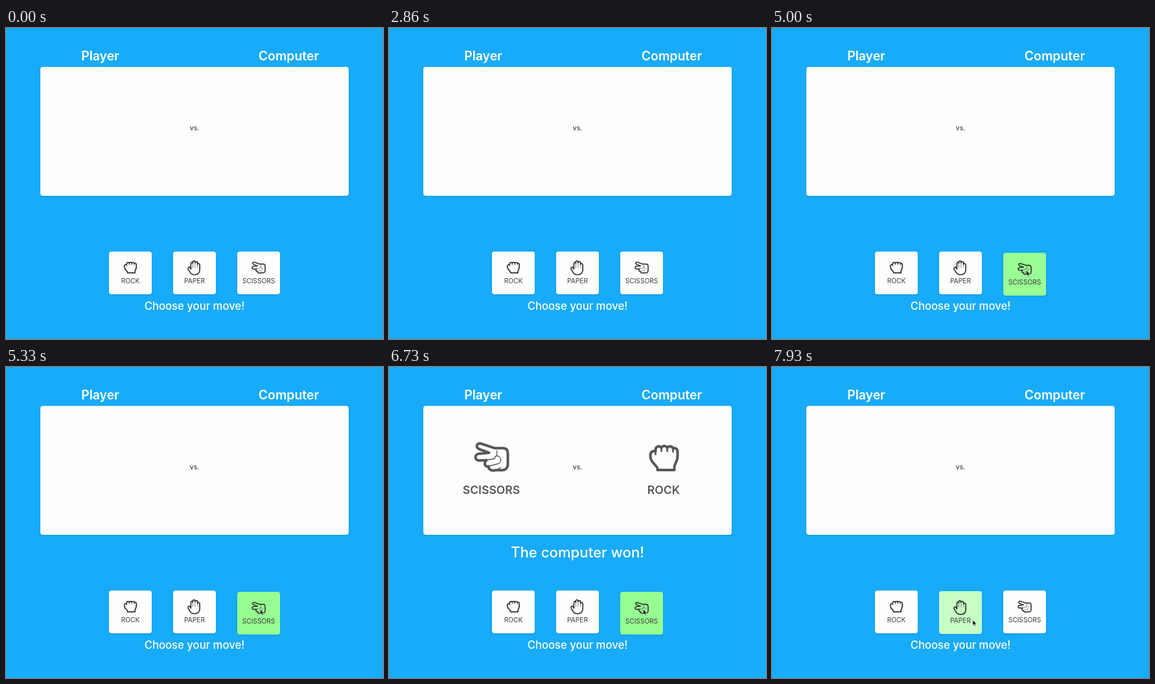
An HTML page for the animation above (8 s loop, 582 by 480 pixels).

```html
<!DOCTYPE html>
<html lang="en">
<head>
<meta charset="utf-8">
<title>Rock Paper Scissors</title>
<style>
  html, body { margin: 0; width: 100%; height: 100%; overflow: hidden; background: #18abf9; }
  svg { display: block; width: 582px; height: 480px; }
  text { font-family: Inter, "Open Sans", sans-serif; text-anchor: middle; }
  .light { fill: #fff; font-weight: 500; }
  .heading { font-size: 19.4px; font-weight: 600; }
  .label { fill: #3c3c3c; font-size: 10.2px; }
  .choice { fill: #575757; font-size: 17.6px; font-weight: 600; }
  .box { filter: drop-shadow(0 1px 1px rgba(0, 0, 0, .12)); }
  .icon { fill: none; stroke-width: 4; stroke-linejoin: round; stroke-linecap: round; }
  .icon .thin { stroke-width: 1.4; }
</style>
</head>
<body>
<svg viewBox="0 0 582 480">
  <defs>
    <g id="rock" class="icon">
      <path d="M-10 18V16C-10 11-21 7-21-3V-5C-21-10-17-12-13-11V-13C-13-19-6-20-4-16C-3-20 4-20 5-16C7-20 13-19 14-15C17-17 21-15 21-10V-3C21 5 16 8 16 14V18Z"/>
      <path d="M-13-11v5M-4-16v5M5-16v5M14-15v5" stroke-width="2.6"/>
    </g>
    <g id="paper" class="icon">
      <path d="M-13 5V-15C-13-21-7-21-6-16V-20C-6-26 2-26 2-20V-18C3-23 11-23 11-17V-12C12-17 19-16 19-10V6C19 18 12 25 1 25H-1C-9 25-14 20-17 15L-23 5C-25-1-19-4-16 0Z"/>
      <path class="thin" d="M-6-16V-1M2-18V-1M11-12V-1"/>
    </g>
    <g id="scissors" class="icon">
      <path d="M5-14L-16-21C-23-23-26-15-19-12.5L-4-7L-19-5.5C-27-5-27 5-19 5L-8 4.500C-13 10-10 15-5 14C-5 19 0 21.500 5 20H16C22 20 25 16 25 10V-5C25-11 23-14 18-14Z"/>
      <path class="thin" d="M-8 4.500L5 2M-5 14L8 10.500M8-10V-2C16-2 16 10 8 10.500M5 2C4-1 6-2 8-2M5 20L14 16"/>
    </g>
  </defs>

  <rect width="582" height="480" fill="#18abf9"/>
  <text class="light heading" x="145.500" y="50.300">Player</text>
  <text class="light heading" x="436.500" y="50.300">Computer</text>
  <rect class="box" x="53" y="60" width="476" height="199" rx="4" fill="#fefefd"/>
  <text class="label" x="291" y="158" font-weight="500">vs.</text>

  <g id="result" stroke="#575757">
    <use href="#scissors" x="158.500" y="139.300"/>
    <use href="#rock" x="424.500" y="141"/>
    <g stroke="none">
      <text class="choice" x="158" y="195.500">SCISSORS</text>
      <text class="choice" x="424" y="195.500">ROCK</text>
      <text class="light" x="291" y="293.700" font-size="22.200">The computer won!</text>
    </g>
  </g>

  <g id="cards"></g>
  <text class="light" x="291" y="435" font-size="16.700">Choose your move!</text>
  <path id="cursor" d="M0 0V8.200L1.900 6.600L3.200 9.400L4.600 8.800L3.300 6.100H5.800Z" fill="#111" stroke="#fff" stroke-width=".5"/>
</svg>
<script>
const LOOP = 8000, SHOW = 5400, RESET = 7400;
const $ = id => document.getElementById(id);
const clamp = v => Math.min(1, Math.max(0, v));

// Cursor stops: time, x, y
const path = [
  [4060, 480, 350], [4330, 447, 358], [4600, 417, 366], [4800, 399, 372], [4960, 392.500, 374],
  [7380, 392.500, 374], [7530, 356.500, 389.500], [7775, 324, 391], [7930, 310, 390.500], [8000, 306, 390.500]
];

const cards = [['rock', 192, .44], ['paper', 291, .43], ['scissors', 390, .4]].map(([name, x, scale]) => {
  $('cards').insertAdjacentHTML('beforeend', `<g>
    <rect class="box" x="${x - 33}" y="345" width="66" height="66" rx="4"/>
    <use href="#${name}" stroke="#333" transform="translate(${x} 370) scale(${scale})"/>
    <text class="label" x="${x}" y="394">${name.toUpperCase()}</text></g>`);
  return $('cards').lastElementChild;
});

// CSS "ease" curve, solved by bisection
function ease(x) {
  x = clamp(x);
  let lo = 0, hi = 1;
  const bezier = (s, a, b) => 3 * (1 - s) ** 2 * s * a + 3 * (1 - s) * s * s * b + s ** 3;
  for (let i = 0; i < 16; i++) {
    const mid = (lo + hi) / 2;
    if (bezier(mid, .25, .25) < x) lo = mid; else hi = mid;
  }
  return bezier(lo, .1, 1);
}

function setHover(card, amount) {
  const mix = (from, to) => from + (to - from) * amount;
  card.setAttribute('transform', `translate(0 ${2 * amount})`);
  card.firstElementChild.setAttribute('fill', `rgb(${mix(254, 151)} ${mix(254, 255)} ${mix(253, 146)})`);
}

function moveCursor(t) {
  const next = path.findIndex(p => p[0] > t);
  $('cursor').style.display = next > 0 ? '' : 'none';
  if (next < 1) return;
  const [t0, x0, y0] = path[next - 1], [t1, x1, y1] = path[next];
  const k = (t - t0) / (t1 - t0);
  $('cursor').setAttribute('transform', `translate(${x0 + (x1 - x0) * k} ${y0 + (y1 - y0) * k})`);
}

function draw(now) {
  const t = now % LOOP;
  setHover(cards[0], 0);
  setHover(cards[1], ease((t - 7775) / 500));
  setHover(cards[2], t < RESET ? ease((t - 4590) / 500) : 0);
  $('result').style.display = t >= SHOW && t < RESET ? '' : 'none';
  moveCursor(t);
  requestAnimationFrame(draw);
}
draw(0);
</script>
</body>
</html>
```
